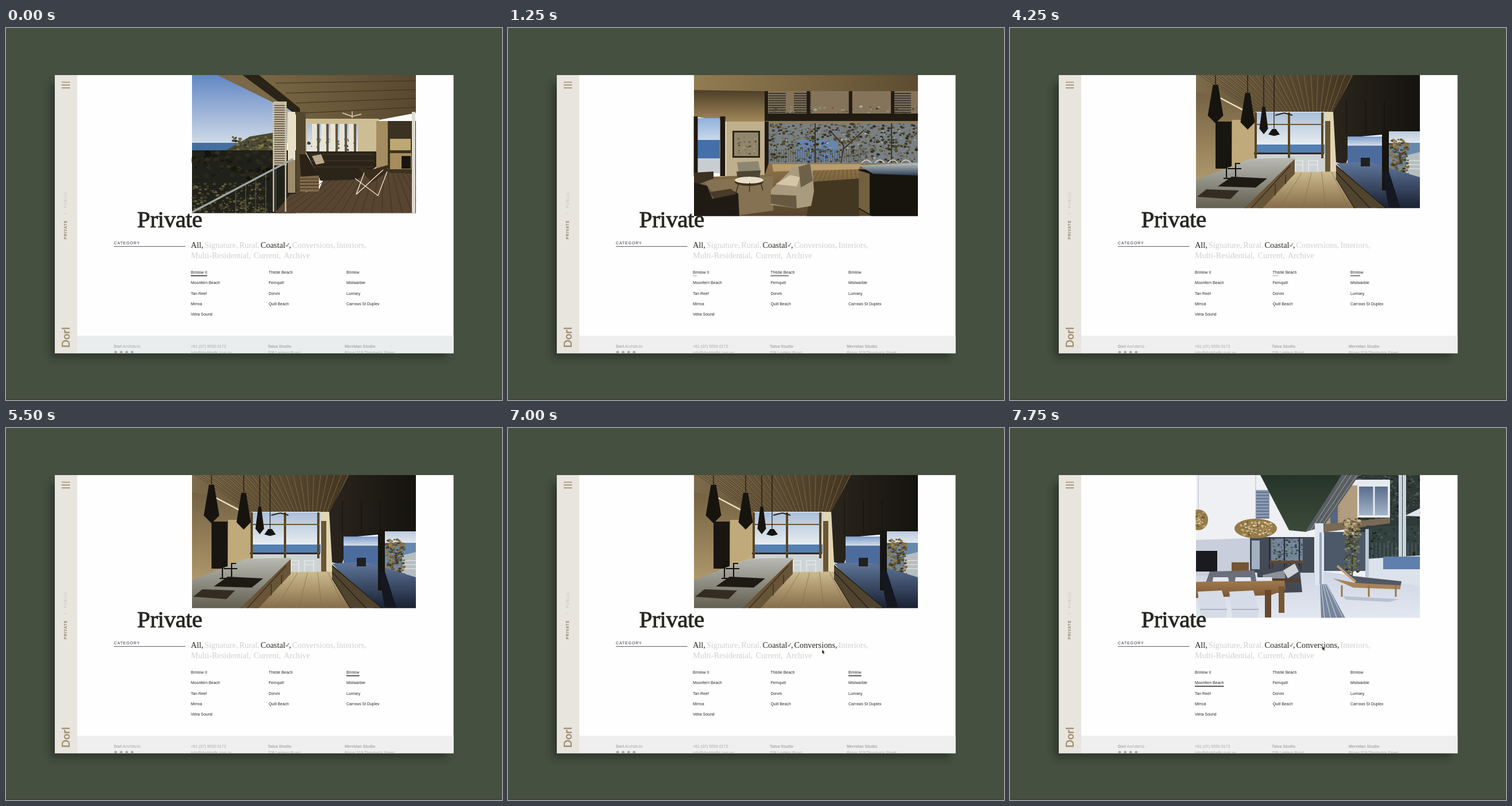
These frames come from a looping animation (864 by 648 pixels, 8 s). An HTML page:

```html
<!DOCTYPE html>
<html lang="en">
<head>
<meta charset="utf-8">
<title>Private homes</title>
<style>
html, body { margin: 0; width: 100%; height: 100%; overflow: hidden; background: #455040; }
svg { display: block; width: 100vw; height: 100vh; }
text { font-family: "Liberation Sans", Arial, sans-serif; white-space: pre; }
.serif { font-family: "Liberation Serif", "Times New Roman", serif; }
.list { font-size: 6.9px; fill: #2b2b2b; }
.foot { font-size: 7px; fill: #a9a9a9; }
.filter { font-size: 14.3px; }
.side { font-size: 6.4px; letter-spacing: .95px; }
</style>
</head>
<body>
<svg viewBox="0 0 864 648">
  <defs>
    <filter id="blur" x="-10%" y="-10%" width="120%" height="120%"><feGaussianBlur stdDeviation="7"/></filter>
    <clipPath id="page"><rect x="85" y="82" width="694.6" height="484.4"/></clipPath>
  </defs>
  <rect width="864" height="648" fill="#455040"/>
  <rect y="646.5" width="864" height="1.5" fill="#3d443a"/>
  <rect x="78" y="96" width="691" height="478" fill="#1d241a" opacity=".6" filter="url(#blur)"/>
  <g clip-path="url(#page)">
    <rect x="85" y="82" width="695" height="485" fill="#fefefe"/>
    <rect x="85" y="82" width="39" height="485" fill="#e7e5de"/>
    <path d="M97 94.5h14.5M97 99.4h14.5M97 104.3h14.5" stroke="#a08d6c" stroke-width="1.7"/>
    <rect id="footer" x="124" y="536" width="656" height="31"/>
    <g id="photos"></g>
    <g id="copy"></g>
    <g id="lines"></g>
    <path id="cursor" d="M0 0V7.2L1.7 5.7 2.9 8.3 4.1 7.8 3 5.2H5.2Z" fill="#111" stroke="#fff" stroke-width=".45"/>
  </g>
</svg>
<script>
const $ = id => document.getElementById(id);
const LOOP = 8000, STEP = 250, INK = "#262621", FAINT = "#d0d0d0";
const mix = (a, b, k) => a + (b - a) * k;
const repeat = (n, f) => Array.from({ length: n }, (_, i) => f(i)).join("");

// Drawing helpers return markup
const box = (fill, x, y, w, h) => `<rect x="${x}" y="${y}" width="${w}" height="${h}" fill="${fill}"/>`;
const shape = (fill, d) => `<path d="M${d}Z" fill="${fill}"/>`;
const line = (color, w, d) => `<path d="M${d}" fill="none" stroke="${color}" stroke-width="${w}"/>`;
const oval = (fill, x, y, rx, ry) => `<ellipse cx="${x}" cy="${y}" rx="${rx}" ry="${ry}" fill="${fill}"/>`;

let paints = 0;
function fade(a, b, across, draw) {
  const id = "paint" + paints++;
  return `<linearGradient id="${id}" x2="${across ? 1 : 0}" y2="${across ? 0 : 1}"><stop stop-color="${a}"/><stop offset="1" stop-color="${b}"/></linearGradient>` + draw(`url(#${id})`);
}
const fadeBox = (a, b, ...r) => fade(a, b, 0, p => box(p, ...r));
const fadeShape = (a, b, d, across) => fade(a, b, across, p => shape(p, d));

// Evenly spaced lines from edge a-b to edge c-d
const rays = (n, color, w, [ax, ay, bx, by], [cx, cy, dx, dy]) => line(color, w, repeat(n, i => {
  const k = n > 1 ? i / (n - 1) : 0;
  return `${i ? "M" : ""}${mix(ax, bx, k)} ${mix(ay, by, k)}L${mix(cx, dx, k)} ${mix(cy, dy, k)}`;
}));
const slats = (n, color, w, x, y, width, height) => rays(n, color, w, [x, y, x, y + height], [x + width, y, x + width, y + height]);
const posts = (n, color, w, x, y, width, height) => rays(n, color, w, [x, y, x + width, y], [x, y + height, x + width, y + height]);

let seed = 7;
const rnd = () => (seed = seed * 16807 % 2147483647) / 2147483647;
// Scattered blobs, spread around one colour
const leaves = (n, x, y, w, h, [hue, sat, light], size = 2.6) => repeat(n, () => {
  const r = size * mix(.4, 1.2, rnd()), tone = `hsl(${hue} ${sat}% ${light * mix(.5, 1.5, rnd())}%)`;
  return oval(tone, x + w * rnd(), y + h * rnd(), r, r * .7);
});
const pendant = (x, top, bottom, w) => line("#15130f", 1.2, `${x} 82V${top}`) +
  shape("#17140f", `${x - w / 6} ${top}h${w / 3}L${x + w / 2} ${mix(top, bottom, .8)} ${x} ${bottom} ${x - w / 2} ${mix(top, bottom, .8)}`);
const basket = (x, y, rx, ry) => line("#a9adb3", .8, `${x} 82V${y - ry}`) + oval("#957b49", x, y, rx, ry) +
  leaves(rx * 4, x - rx * .75, y - ry * .7, rx * 1.5, ry * 1.4, [40, 38, 55], 2);
const whiteChair = x => shape("#d6dce7", `${x} 285l42-2 10 35-3 13h-44`) + line("#9da8bd", 1.5, `${x + 4} 316h47`);

const veranda = () =>
  fadeBox("#6287c4", "#cfdae8", 324, 82, 180, 119) + box("#456f9f", 324, 200, 145, 14) +
  shape("#4a4b33", "378 216L425 189 467 182V222") + leaves(110, 395, 190, 72, 26, [48, 24, 30]) +
  box("#20211a", 324, 213, 181, 110) + leaves(110, 326, 216, 138, 46, [60, 20, 11], 5) + leaves(260, 326, 270, 130, 52, [50, 24, 23]) +
  shape("#7a6848", "368 82H420L505 146 466 130") + fadeShape("#7d6a45", "#584830", "420 82H714V148L650 160H522L505 136", 1) +
  rays(4, "#3b301f", 1, [470, 96, 522, 148], [714, 92, 714, 138]) + shape("#2a2317", "412 82h29l71 58v16") +
  box("#cdbd94", 505, 158, 145, 64) + box("#54472f", 505, 146, 17, 150) + fadeBox("#aabfda", "#e3eaf0", 524, 167, 89, 48) +
  leaves(45, 526, 192, 85, 22, [50, 18, 36]) + posts(5, "#ece4cf", 8, 537, 167, 64, 48) + posts(5, "#5f553f", 4, 544, 167, 64, 48) +
  box("#3c3221", 645, 162, 69, 92) + box("#a38d60", 645, 162, 20, 84) + box("#bda772", 669, 193, 36, 20) + box("#a58d5c", 669, 218, 37, 28) + box("#17150f", 689, 223, 16, 22) +
  shape("#574531", "468 323L495 290 545 282 560 248 714 254V323") + rays(20, "#3b2e20", .9, [560, 250, 714, 254], [440, 323, 780, 323]) +
  shape("#2b2419", "522 215H645V242L612 264 548 266") + slats(3, "#4c3e29", 1, 530, 220, 110, 22) +
  shape("#2b2116", "511 220h12l22 38-31 2") + shape("#80694a", "512 259l33-2v28h-33") + slats(4, "#38291a", 1.2, 512, 263, 33, 17) + shape("#b9a98a", "533 223l16-3 6 15-15 3") +
  box("#c4baa2", 466, 128, 23, 112) + slats(27, "#584b37", 1.5, 467, 135, 22, 104) + posts(2, "#cfc2a5", 2.5, 466, 130, 21, 190) +
  box("#e8dfc8", 491, 146, 13, 84) + box("#9d8c6c", 491, 230, 13, 57) + line("#9ea6a3", 3.3, "324 321L500 228") +
  rays(5, "#5d6460", 1, [400, 282, 470, 246], [400, 322, 470, 322]) + box("#dedacd", 707, 146, 6, 177) +
  shape("#3a2d1c", "612 243l23 4 33-9-8 16-22 15") + line("#eee5cc", 1.4, "610 290L657 247M608 262L648 292 664 250M610 290L624 252") +
  line("#ded3b3", 1.5, "586 148L603 154 619 150M603 145V157");

const lounge = () =>
  fadeShape("#927c52", "#5d4c30", "324 82H714V110H447L380 122 324 108", 1) + fadeShape("#4c3e27", "#a18859", "324 108L447 110V163H380L324 154") +
  box("#85745a", 447, 110, 267, 40) + leaves(60, 455, 136, 257, 13, [55, 12, 42]) + [454, 498, 672].map(x => slats(9, "#38372e", 2, x, 114, 30, 33)).join("") +
  posts(4, "#211b13", 6, 450, 110, 220, 42) + box("#211b13", 447, 149, 267, 13) + box("#8f7955", 447, 162, 267, 4) +
  box("#788085", 454, 166, 260, 72) + box("#6686b2", 505, 195, 70, 38) + leaves(620, 456, 167, 256, 66, [46, 20, 27]) + leaves(90, 456, 167, 256, 60, [50, 16, 52], 1.6) +
  line("#3d3323", 2, "580 235L585 205 562 180M585 210L620 178M668 166V235M535 166V235") + posts(40, "#4a4436", .7, 456, 211, 158, 22) +
  box("#c0af8b", 380, 163, 67, 100) + box("#2e261a", 391, 179, 48, 47) + box("#8f866c", 394, 182, 42, 41) + leaves(45, 397, 188, 36, 32, [44, 20, 38], 1.8) +
  fadeBox("#8fb0dc", "#cbdaea", 329, 157, 40, 39) + box("#446fa8", 329, 195, 40, 32) + box("#c8cdd0", 329, 227, 40, 26) + posts(2, "#1f1911", 9, 326, 154, 48, 104) + box("#211b13", 447, 163, 7, 100) +
  fadeShape("#8f744b", "#57442b", "324 260L447 256 454 236H714V328H324") + rays(18, "#594529", .7, [535, 240, 640, 240], [470, 328, 700, 328]) + shape("#b99d6c", "460 237H615L611 246 462 250") + shape("#443721", "530 268L612 262V328H520") +
  shape("#857252", "340 266L462 258V318L390 328") + shape("#3b3021", "324 252l34-2v12l-34 13") +
  shape("#8d8772", "399 234l37-2 4 20-38 2") + shape("#4d4636", "398 250l42-2-2 14-38 2") +
  oval("#42331f", 420, 268, 25, 7) + oval("#e6dec9", 420, 265, 25, 6) + rays(3, "#3c2f1e", 1.5, [402, 270, 440, 269], [397, 287, 444, 283]) +
  shape("#201a14", "324 269l23 6 9 23 34-15 11 5 2 40h-79") + shape("#493b29", "350 286l38-6 11 9-39 8") +
  shape("#a99b7d", "458 282L498 242 516 236 530 240 533 285 528 310 504 314 458 308") + shape("#d3c5a5", "466 272l26-16 17 4-6 16") + shape("#6e6149", "506 242l20-6 5 30-21 12") + shape("#665a43", "458 290l44 2 1 22-45-8") +
  repeat(4, i => line("#e0d8c0", 1.5, `${616 + i * 23} 235q8-10 17 0`)) + shape("#17140e", "611 246L714 250V328H634L611 315") +
  fadeShape("#bcc2bd", "#2e405a", "611 239L714 235V257L636 254") + shape("#72603f", "611 248l19 6v70l-19-11");

const kitchen = () =>
  fadeBox("#69573a", "#b49d70", 324, 82, 104, 200) + fadeShape("#7d6b4b", "#40331f", "324 82H600L568 146H424L356 118 324 112", 1) +
  rays(46, "#4a3c26", .8, [330, 82, 596, 82], [427, 146, 565, 146]) + rays(23, "#927a54", .7, [333, 82, 596, 82], [429, 146, 565, 146]) + line("#f1e4c1", 2.5, "359 118L408 144") +
  box("#191611", 358, 163, 28, 82) + box("#c0aa7b", 387, 160, 41, 80) + fadeBox("#aabfda", "#e9eef0", 428, 147, 120, 57) + box("#5480b2", 428, 203, 120, 15) + box("#cdd3d6", 428, 219, 120, 32) +
  box("#32281a", 425, 217, 122, 3) + posts(3, "#584526", 4, 428, 147, 116, 80) + line("#6c5737", 2, "428 168H546") +
  box("#e2d5b4", 548, 146, 20, 108) + box("#6b5634", 549, 162, 9, 94) + fadeShape("#cdbb90", "#856d49", "486 251L568 250 604 314H430") + rays(4, "#826c47", .7, [508, 252, 560, 250], [470, 314, 590, 314]) +
  fadeShape("#2a251c", "#15130f", "598 82H714V180L600 190 585 238 568 234 563 146", 1) + posts(3, "#11100c", 1, 586, 125, 66, 60) +
  fadeBox("#7f9fcb", "#dce4ec", 588, 189, 60, 18) + box("#4c6c9e", 588, 205, 60, 35) + fadeBox("#bccbdd", "#e3eaf0", 660, 180, 54, 22) + box("#6889ae", 660, 200, 54, 56) + shape("#b7bec0", "690 222l24-6v52l-24-13") +
  leaves(190, 662, 194, 33, 62, [42, 28, 33]) + slats(3, "#eceeea", 1, 694, 231, 20, 14) +
  fadeShape("#5f779c", "#192031", "568 236L625 233 714 260V314H640") + box("#16140f", 648, 178, 12, 105) + shape("#151820", "648 250h12l20 63h-20") + box("#20201c", 611, 226, 16, 15) +
  shape("#50442f", "568 238L655 314H600L568 262") + rays(3, "#1f1a12", 1.2, [568, 240, 568, 262], [655, 314, 600, 314]) +
  fadeShape("#b9bab3", "#625f50", "324 265L418 228 496 226 487 238 412 314H324") + shape("#685437", "496 228V254L440 314H408") + line("#312718", 1.2, "488 240L420 314M480 256V272M462 272V292") +
  shape("#1d1a14", "386 259L448 262 428 278 362 276") + shape("#332d21", "342 281L399 283 384 298 326 294") + line("#14120e", 2.2, "377 262V238Q378 232 383 234V242M372 262h12M393 260V236h8M379 245h24") +
  line("#f0efe7", 1.2, "497 250V231h13v20M520 250V231h16v20M497 238h13M520 238h16") + line("#2b2216", 2, "462 152L478 148 492 152") +
  pendant(358, 99, 166, 27) + pendant(414, 113, 177, 25) + pendant(442, 137, 185, 15) + pendant(460, 176, 188, 20);

const patio = () =>
  box("#eef0f4", 324, 82, 390, 249) + shape("#c8cedb", "324 195L418 192V256L324 260") + box("#8d9cb3", 428, 108, 24, 50) + slats(9, "#62718a", 2, 429, 112, 22, 44) +
  box("#2f3937", 590, 82, 124, 150) + leaves(380, 606, 82, 108, 78, [150, 9, 23]) + shape("#b19d7f", "572 102L606 92V168H545") + rays(13, "#8c7961", .7, [570, 105, 547, 166], [606, 105, 606, 166]) +
  box("#e6eaef", 590, 90, 72, 66) + box("#b19d7f", 575, 100, 30, 66) + box("#55667e", 558, 135, 13, 32) + fadeBox("#5a6d8a", "#a3b4c8", 608, 102, 50, 50) + posts(2, "#e6eaef", 3, 634, 100, 26, 54) + shape("#7a6a54", "545 168L662 156V166L545 182") +
  box("#4b5968", 547, 181, 73, 68) + box("#33423f", 620, 170, 94, 60) + leaves(80, 624, 175, 88, 50, [155, 10, 22]) + posts(14, "#758599", .6, 624, 200, 90, 30) +
  shape("#dce2ea", "620 228L714 222V276L620 262") + box("#5f7fac", 650, 224, 64, 22) + box("#bcc7d4", 619, 176, 6, 84) + posts(2, "#cbd5df", 6, 680, 82, 7, 142) + shape("#dfe5ec", "688 153L714 140V154") +
  fadeShape("#ced5e4", "#e3e7f0", "324 258L545 250 620 260 714 276V331H324") +
  fadeShape("#26352a", "#3b4a38", "436 82H578L516 181 486 178") + shape("#595e61", "578 82H608L546 172 514 181") + rays(3, "#a5a9ad", 1, [586, 82, 604, 82], [523, 179, 541, 174]) +
  box("#434b56", 418, 190, 112, 62) + box("#75859a", 455, 193, 55, 42) + leaves(130, 457, 194, 52, 40, [185, 12, 36], 2) + posts(3, "#222b34", 2, 452, 190, 52, 60) + box("#a3b0c2", 421, 196, 14, 50) +
  box("#dfe5ee", 531, 166, 15, 108) + box("#95a4ba", 539, 182, 4, 90) + box("#191b20", 324, 214, 37, 36) + box("#745536", 386, 234, 30, 20) + box("#5f4932", 452, 231, 60, 5) + posts(3, "#44382d", 2, 457, 235, 50, 14) +
  shape("#6b6f7a", "348 250l78-2 4 24h-90") + shape("#454953", "430 248L504 240 509 286 434 288") + shape("#8d919b", "440 256l38-8 2 16-38 6") + shape("#d1d2d5", "476 248l20-12 7 14-19 12") + box("#553f2b", 448, 262, 58, 6) +
  [354, 393, 430].map(x => shape("#e3e7ee", `${x} 260h26l2 12h-30`)).join("") +
  fadeShape("#a0794d", "#795634", "324 268L478 266 480 281 455 291 324 296") + box("#66492c", 444, 282, 11, 48) + box("#765735", 468, 276, 10, 46) + whiteChair(327) + whiteChair(382) +
  shape("#77869a", "540 272h12l32 59h-42") + rays(4, "#d7dee9", 1, [542, 272, 551, 272], [548, 331, 580, 331]) +
  line("#473c2a", 2, "596 188V258") + leaves(120, 580, 158, 31, 32, [43, 28, 48]) + leaves(150, 583, 186, 25, 66, [70, 16, 31]) +
  shape("#505865", "571 240l27 18 84 9-2 10-78-7") + shape("#a68358", "562 262l40 8 78 4v7l-82-3") + posts(3, "#987449", 3, 578, 274, 94, 20) + line("#bd9c6f", 4, "570 240L602 268") + shape("#b8c1d2", "580 293l98 5-18 5-75-4") +
  basket(428, 175, 37, 17) + basket(328, 160, 17, 18);

// Each photo is shown with its project underlined
const scenes = [
  { at: -1000, name: "Brinlow II", draw: veranda, height: 240.5 },
  { at: 1250, name: "Thistle Beach", draw: lounge, height: 245.5 },
  { at: 4250, name: "Brinlow", draw: kitchen, height: 231.7 },
  { at: 7250, name: "Moonfern Beach", draw: patio, height: 248.5 }
];
$("photos").innerHTML = scenes.map((s, i) =>
  `<clipPath id="crop${i}">${box("#000", 323.6, 82, 390.6, s.height)}</clipPath><g class="photo" clip-path="url(#crop${i})">${s.draw()}</g>`).join("");

const text = (cls, x, y, str, more = "") => `<text class="${cls}" x="${x}" y="${y}" ${more}>${str}</text>`;
const turned = (cls, x, y, str, more) => text(cls, 0, 0, str, `transform="translate(${x} ${y}) rotate(-90)" ${more}`);
const bold = str => `<tspan font-weight="bold">${str}</tspan>`;
const columns = [
  ["Brinlow II", "Moonfern Beach", "Tan Reef", "Mirroa", "Velra Sound"],
  ["Thistle Beach", "Fernquill", "Dorvin", "Quill Beach"],
  ["Brinlow", "Mistwarble", "Lumsey", "Carrows St Duplex"]
];
const footer = [
  [bold("Dorl") + " Architects", ""],
  ["+61 (07) 5550 0172", "info@dorldrafts.com.au"],
  [bold("Talva Studio"), "208 Lantern Road"],
  [bold("Merridan Studio"), "Room 319 Thornwick Street"]
];
const chosen = ["All,", "Coastal", ","];
const words = (y, gap, list) => text("serif filter", 322, y,
  list.map((w, i) => `<tspan class="word" dx="${w == "," ? 6.5 : i ? gap : 0}">${w}</tspan>`).join(""));

$("copy").innerHTML =
  text("serif", 228.5, 347, "Private", `font-size="41" letter-spacing="-.4" fill="${INK}" stroke="${INK}" stroke-width=".9"`) +
  text("", 188, 377.4, "CATEGORY", 'font-size="6.8" letter-spacing="1" fill="#333"') + box("#5b5a70", 188, 380, 124.5, 1) +
  words(383, 2, ["All,", "Signature,", "Rural,", "Coastal", ",", "Conversions,", "Interiors,"]) +
  words(401, 5, ["Multi-Residential,", "Current,", "Archive"]) + line(INK, .8, "487.5 378l1.8 2.6 3.6-6") +
  columns.map((col, c) => col.map((s, r) => text("list", 322 + c * 135.5, 428 + r * 18.25, s)).join("")).join("") +
  footer.map((rows, c) => rows.map((s, r) => text("foot", 188 + c * 134, 556.6 + r * 11, s)).join("")).join("") +
  repeat(4, i => oval("#a4a4a4", 191 + i * 9.6, 565, 2.4, 2.4)) +
  turned("side", 106.3, 368, "PRIVATE", 'font-weight="bold" fill="#8d7f66"') + turned("side", 106.3, 324, "/", 'fill="#b9b5aa"') +
  turned("side", 106.3, 313.5, "PUBLIC", 'fill="#c3c1ba"') +
  turned("", 111, 557, "Dorl", 'style="font:bold 18.5px Lato,sans-serif" fill="#a08d6c"');

const labels = [...document.querySelectorAll(".list")];
const filters = [...document.querySelectorAll(".word")];
const photos = [...document.querySelectorAll(".photo")];

// Pointer stops: time, x, y
const stops = [[5750, 760, 338], [6000, 622, 380], [6750, 637, 388], [7000, 547, 386], [7500, 544, 380], [LOOP, 544, 380]];

function underline(name, share, color) {
  const el = labels.find(l => l.textContent == name);
  return box(color, el.getAttribute("x"), +el.getAttribute("y") + 2.8, el.getComputedTextLength() * share, 1.5);
}

function pointer(t) {
  const i = stops.findIndex(s => s[0] > t), a = stops[i - 1], b = stops[i];
  if (!a) return null;
  const k = (t - a[0]) / (b[0] - a[0]);
  return `translate(${mix(a[1], b[1], k)} ${mix(a[2], b[2], k)})`;
}

// The picture advances four times a second
function update(ms) {
  const t = Math.floor(ms / STEP) * STEP;
  const now = scenes.filter(s => s.at <= t).length - 1;
  const share = Math.min(1, .75 + (t - scenes[now].at) / 1000);
  photos.forEach((p, i) => p.style.display = i == now ? "" : "none");
  $("lines").innerHTML = share < 1
    ? underline(scenes[now - 1].name, 1 - share, "#bcbcbc") + underline(scenes[now].name, share, "#55596a")
    : underline(scenes[now].name, 1, INK);

  const hover = t >= 7000 ? "Conversions," : t >= 6000 && t < 6750 ? "Interiors," : "";
  filters.forEach(w => w.setAttribute("fill", chosen.includes(w.textContent) || w.textContent == hover ? INK : FAINT));
  $("footer").setAttribute("fill", now ? "#efefef" : "#e9edee");

  const place = pointer(t);
  $("cursor").style.display = place ? "" : "none";
  if (place) $("cursor").setAttribute("transform", place);
}

const start = performance.now();
function tick() {
  update((performance.now() - start) % LOOP);
  requestAnimationFrame(tick);
}
tick();
</script>
</body>
</html>
```
